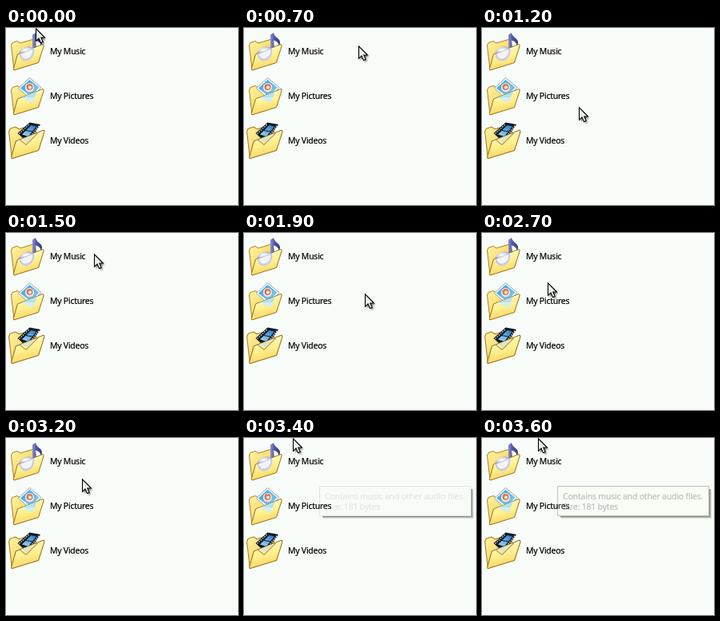
Animation, 290 px wide and 222 px high, one loop 3700 ms. Source, as an HTML page:

```html
<!DOCTYPE html>
<html lang="en">
<head>
<meta charset="utf-8">
<title>My Folders</title>
<style>
  html, body { margin: 0; width: 100%; height: 100%; overflow: hidden; background: #f8fcf8; }
  svg { display: block; width: 290px; height: 222px; }
  text { font: 10.5px "Noto Sans", "Open Sans", sans-serif; letter-spacing: -.25px; stroke: #000; stroke-width: .2px; }
  #tip text { letter-spacing: -.2px; }
</style>
</head>
<body>
<svg viewBox="0 0 290 222">
  <defs>
    <linearGradient id="back" x1="0" y1="0" x2="1" y2="1">
      <stop offset="0" stop-color="#fff6a8"/><stop offset=".5" stop-color="#f8dc70"/><stop offset="1" stop-color="#d8a838"/>
    </linearGradient>
    <linearGradient id="front" x1=".3" y1="0" x2=".6" y2="1">
      <stop offset="0" stop-color="#fffcc8"/><stop offset=".5" stop-color="#fff090"/><stop offset="1" stop-color="#f4d058"/>
    </linearGradient>
    <linearGradient id="note" x1="0" y1="0" x2="1" y2="0">
      <stop offset="0" stop-color="#8c92d0"/><stop offset=".4" stop-color="#5058a8"/><stop offset="1" stop-color="#303880"/>
    </linearGradient>
    <radialGradient id="disc" cx=".45" cy=".5" r=".6">
      <stop offset="0" stop-color="#fff"/><stop offset=".5" stop-color="#dde0f2"/><stop offset="1" stop-color="#a4aad0"/>
    </radialGradient>
    <linearGradient id="sky" x1="0" y1="0" x2="1" y2="1">
      <stop offset="0" stop-color="#3898d8"/><stop offset="1" stop-color="#90d4f4"/>
    </linearGradient>
    <linearGradient id="film" x1="0" y1="1" x2="1" y2="0">
      <stop offset="0" stop-color="#a8dcf8"/><stop offset="1" stop-color="#2078c8"/>
    </linearGradient>
    <filter id="soft" x="-40%" y="-40%" width="180%" height="180%"><feGaussianBlur stdDeviation=".8"/></filter>
    <path id="folderBack" d="M6.500 22 8 18.500 14 16.500 18 19 36 13.500 41 42 10 52.500Z"
      fill="url(#back)" stroke="#a88028" stroke-linejoin="round"/>
    <g id="folderFront" stroke-linejoin="round">
      <path d="M14.500 33 46 20.500Q47.500 20.500 47 23L40.500 43.500 10 53Q9 52.500 9.500 50.500Z" fill="url(#front)" stroke="#987018"/>
      <path d="M15.500 34 45.500 22" fill="none" stroke="#fffee8"/>
    </g>
  </defs>

  <!-- Each item stands behind the front flap, which shows its pale reflection -->
  <g>
    <use href="#folderBack"/>
    <path d="M33 8.500 37 6C38 12 45.500 13 45 18.500Q45 20.500 43.500 22C43 17.500 40 16.500 37 15.500V30H33Z" fill="url(#note)"/>
    <ellipse cx="26" cy="31" rx="9.500" ry="6.500" transform="rotate(-20 26 31)" fill="url(#disc)" stroke="#8c92c0" stroke-width=".8"/>
    <use href="#folderFront"/>
    <path d="M17 32C18 24 31 21 34.500 26Z" fill="url(#disc)"/>
    <path d="M16.500 33 35 25.500C37 34 31 41 25 41.500Q18 41.500 16.500 33Z" fill="#c8cce4"/>
    <path d="M18.500 33 33 27C34 33 30 38 25 38.500Q20 38.500 18.500 33Z" fill="#f4f4f8"/>
  </g>

  <g transform="translate(0 56)">
    <use href="#folderBack"/>
    <path d="M29.500 6.500 44 18.500 31 33.500 15.500 19.500Z" fill="#f4faff" stroke="#7890a8" stroke-width=".8"/>
    <path d="M29.500 9 41.500 18.500 31 30 18 19.500Z" fill="url(#sky)"/>
    <circle cx="29.500" cy="18.500" r="5.500" fill="#f8ece4"/>
    <circle cx="29.500" cy="18" r="4" fill="#d87850"/>
    <circle cx="30" cy="18.500" r="2" fill="#f8f0e8"/>
    <use href="#folderFront"/>
    <path d="M20 31 39 23.500 33 38Z" fill="#b4e0f0"/>
    <path d="M20 31 33 38 36 31Z" fill="#e8f6f4" opacity=".6"/>
  </g>

  <g>
    <use href="#folderBack" transform="translate(-3.500 106) scale(1.09)"/>
    <path d="M14.500 132 29.500 118.500 43 121 31 138 23 140Z" fill="#101820"/>
    <path d="M20 133.500 31.500 122 38 123.500 28 136Z" fill="url(#film)"/>
    <path d="M25 128.500 33.500 130" fill="none" stroke="#101820"/>
    <path d="M16.500 132.500 29.500 120.500M29 138 41.500 122" fill="none" stroke="#e0e8f0" stroke-width="1.300" stroke-dasharray="1.500 1.500"/>
    <use href="#folderFront" transform="translate(-3.500 106) scale(1.09)"/>
    <path d="M17 140 25 146.500 40 131.500" fill="none" stroke="#b89858" stroke-width="1.300"/>
    <path d="M19.500 139.500 36 133 26 143.500Z" fill="#d8e4d0"/>
  </g>

  <text x="55" y="33">My Music</text>
  <text x="55" y="89">My Pictures</text>
  <text x="55" y="145">My Videos</text>

  <g id="shadow" fill="none" stroke="#303830">
    <path d="M98 98.500H284.500V64" opacity=".55"/>
    <path d="M98 99.500H285.500V64" opacity=".35"/>
    <path d="M99 100.500H286.500V65" opacity=".15"/>
  </g>
  <g id="tip">
    <path d="M94.500 60.500H283.500V97.500H94.500Z" fill="#ffffee" stroke="#000"/>
    <text x="101" y="77">Contains music and other audio files.</text>
    <text x="101" y="90">Size: 181 bytes</text>
  </g>

  <g id="cursor">
    <path d="M2.500 3V18.500L6 15.500 8.500 20.500 11 19.500 8.500 14.500H13Z" fill="#000" opacity=".55" filter="url(#soft)"/>
    <path d="M.5.8V16.300L4 13 6.500 18.600 9.200 17.400 6.800 12H11.500Z" fill="#eceeec" stroke="#000" stroke-width="1.100"/>
  </g>
</svg>
<script>
const LOOP = 3700, STEP = 100, TIP_START = 3400;

// Cursor waypoints: time, x, y
const path = [
  [300, 37, 0], [500, 95, 5], [700, 143, 22], [900, 156, 56],
  [1200, 121, 99], [1400, 100, 58], [1500, 110, 26], [1600, 126, 23],
  [1900, 151, 76], [2100, 137, 129], [2200, 125, 139], [2400, 101, 122],
  [2700, 82, 62], [2800, 82, 62], [3200, 95, 51], [3300, 94, 40],
  [3400, 61, 0], [3600, 70, 0]
];

const [cursor, tip, shadow] = ["cursor", "tip", "shadow"].map(id => document.getElementById(id));

function slope(i, axis) {
  const before = path[i - 1], after = path[i + 1];
  return before && after ? (after[axis] - before[axis]) / (after[0] - before[0]) : 0;
}

// Smooth cubic curve through the waypoints
function position(time, axis) {
  if (time <= path[0][0]) return path[0][axis];
  const i = path.findIndex(point => point[0] >= time);
  const a = path[i - 1], b = path[i];
  const span = b[0] - a[0], u = (time - a[0]) / span, v = 1 - u;
  const value = a[axis] * (1 + 2 * u) * v * v + b[axis] * (3 - 2 * u) * u * u
    + span * u * v * (slope(i - 1, axis) * v - slope(i, axis) * u);
  return Math.max(0, Math.round(value));
}

function draw(now) {
  const time = Math.floor(now % LOOP / STEP) * STEP;
  const fade = Math.max(0, (time - TIP_START) / STEP + 1);
  cursor.setAttribute("transform", `translate(${position(time, 1)} ${position(time, 2)})`);
  tip.setAttribute("opacity", fade * 0.08);
  shadow.setAttribute("opacity", fade ? 1 : 0);
}

function play() {
  draw(performance.now());
  requestAnimationFrame(play);
}
play();
</script>
</body>
</html>
```
